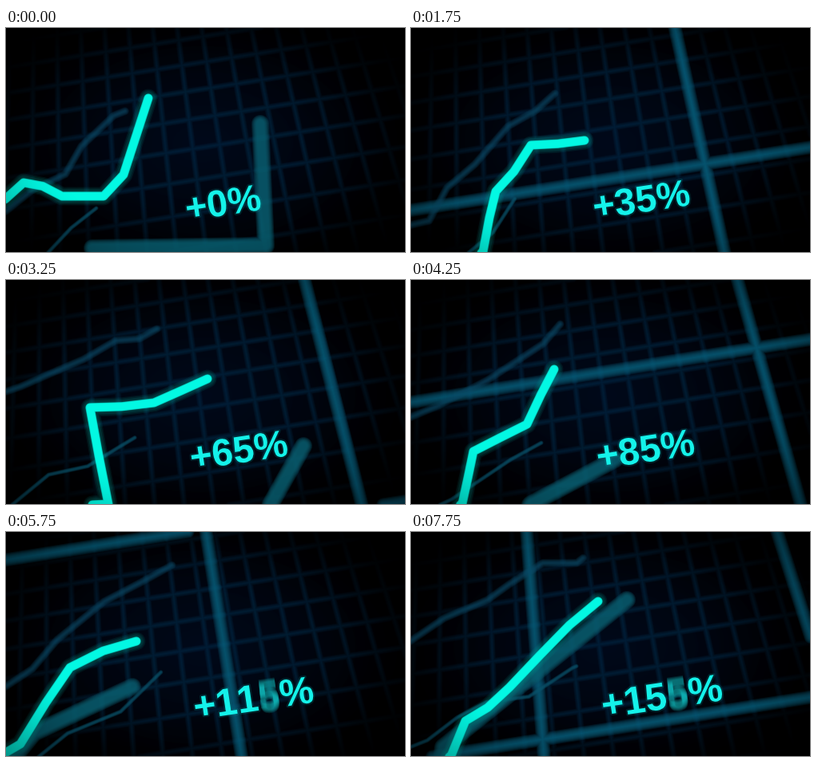
A matplotlib script that plays this animation: 499x281 px, repeating every 8000 ms.

```python
import numpy as np
import matplotlib.pyplot as plt
from matplotlib.animation import FuncAnimation
from matplotlib.patches import PathPatch
from matplotlib.path import Path
from matplotlib.textpath import TextPath

W, H = 499, 281
FRAMES, STEP = 32, 250

# Tilted plane: vertical lines meet at (VX, far above), rows keep one slope
FAR, VX, SLOPE = 1283, 46, 0.158

# Camera path over the plane, in plane units; the first key is a lead-in
TIMES = [-2, 0, 1.75, 3.25, 4.25, 5.75, 6.75, 7.75]
CAM_U = [-340, 0, 300, 635, 1015, 1415, 1577, 1808]
CAM_V = [-210, 0, 215, 300, 450, 639, 769, 839]
COLUMNS = [573, 948, 1360, 1613, 1905, 2198]
PITCH = 292
ROWS = -21 - PITCH * np.arange(3)
CELL = PITCH / 10

# Corners on screen at each camera key; the last one is the tip
MAIN = [
    [(-20, 232), (22, 194), (70, 211), (122, 211), (147, 184), (178, 88)],
    [(90, 281), (106, 205), (150, 147), (217, 141)],
    [(128, 281), (105, 160), (185, 154), (252, 124)],
    [(64, 281), (78, 215), (145, 181), (179, 112)],
    [(18, 266), (80, 170), (163, 137)],
    [(52, 281), (75, 219), (148, 209), (195, 161), (263, 171)],
    [(50, 281), (68, 237), (123, 195), (234, 87)],
]
NEAR = [
    [(108, 276), (325, 273), (318, 120)],
    [(300, 330)],
    [(330, 283), (372, 208)],
    [(150, 281), (255, 225)],
    [(35, 252), (158, 194)],
    [(115, 281), (125, 242), (310, 242)],
    [(40, 270), (270, 85)],
]


def to_plane(p):
    x, y = np.asarray(p, float).T
    d = y + SLOPE * x + FAR
    return np.column_stack([(x - VX) * FAR / d, FAR * (1 - FAR / d)])


def to_screen(u, v):
    d = FAR / (1 - np.asarray(v, float) / FAR)
    x = VX + np.asarray(u, float) * d / FAR
    return x, d - FAR - SLOPE * x


def camera(t):
    return np.interp(t, TIMES, CAM_U), np.interp(t, TIMES, CAM_V)


def shift(t):
    cu, cv = camera(t)
    return np.column_stack([cu, -cv])


class Series:
    """A polyline on the plane whose tip moves along it with time."""

    def __init__(self, pts, times, ends):
        self.pts = np.array(pts)
        gaps = np.hypot(*np.diff(self.pts, axis=0).T)
        self.dist = np.concatenate([[0], np.cumsum(gaps)])
        self.times, self.ends = times, self.dist[ends]

    def at(self, t):
        s = np.interp(t, self.times, self.ends)
        tip = [np.interp(s, self.dist, c) for c in self.pts.T]
        u, v = np.vstack([self.pts[self.dist < s], tip]).T
        cu, cv = camera(t)
        u, v = u - cu, v + cv
        first = np.argmax((u > -300) & (v < 450))
        return to_screen(u[first:], v[first:])


def cornered(stages, rough, seed):
    """Joins the corners of all stages, with bends on the long stretches."""
    rng = np.random.default_rng(seed)
    times = TIMES[1:]
    pts, ends = [], []
    for t, stage in zip(times, stages):
        for b in to_plane(stage) + shift(t):
            if pts:
                a = pts[-1]
                n = int(np.hypot(*(b - a)) // 45)
                for k in range(1, n + 1):
                    pts.append(a + (b - a) * k / (n + 1) + [0, rng.uniform(-rough, rough)])
            pts.append(b)
        ends.append(len(pts) - 1)
    return Series(pts, times, ends)


def traced(start, rate, seed, rough):
    """The jagged trail of a tip that drifts slowly across the screen."""
    rng = np.random.default_rng(seed)
    times = np.arange(-1.6, 8, .16)
    tips = np.array(start) + np.outer(times, rate)
    pts = to_plane(tips) + shift(times) + rng.uniform(-rough, rough, tips.shape)
    return Series(pts, times, np.arange(len(times)))


fig = plt.figure(figsize=((W + .01) / 72, (H + .01) / 72), dpi=72, facecolor="black")
ax = fig.add_axes([0, 0, 1, 1])
ax.axis("off")


def soft(color, width, blur, alpha, z, n=7):
    """Stacked strokes that read as one soft-edged line."""
    a = 1 - (1 - alpha) ** (1 / n)
    widths = np.linspace(width + blur, max(width - blur, .8), n)
    return [ax.plot([], [], color=color, lw=w, alpha=a, zorder=z,
                    solid_capstyle="round", solid_joinstyle="round")[0] for w in widths]


def put(lines, x, y):
    for line in lines:
        line.set_data(x, y)


def shade(image, z):
    ax.imshow(image, extent=(0, W, H, 0), zorder=z, aspect="auto", interpolation="bilinear")


gx, gy = np.meshgrid(np.arange(W) + .5, np.arange(H) + .5)
radius = np.hypot((gx - 245) / 300, (gy - 145) / 190)


def vignette(lo, hi, strength):
    k = np.clip((radius - lo) / (hi - lo), 0, 1)
    img = np.zeros((H, W, 4))
    img[..., 3] = strength * k * k * (3 - 2 * k)
    return img


glow = np.clip(1 - radius / 1.1, 0, 1)[..., None]
shade(glow * np.array([1, 9, 26]) / 255, 0)
shade(vignette(.35, 1.1, 1), 1.2)
shade(vignette(.6, 1.3, .5), 7)

minor = soft("#06304f", 4.5, 3.5, .55, 1, 5)
major = soft("#0a5f7c", 9, 8, .85, 1.5, 9)
layers = [
    (traced((160, 90), (8, -9), 3, 11), soft("#0d4a66", 6, 4, .7, 3)),
    (traced((112, 232), (13, -9), 5, 9), soft("#0c566e", 3.5, 2, .75, 3)),
    (cornered(NEAR, 0, 7), soft("#0b6072", 16, 6, .85, 4)),
    (cornered(MAIN, 4, 11), soft("#00a89c", 15, 8, .5, 5) + soft("#05fbe6", 9.5, 1.8, .99, 6)),
]


def segments(us, vs):
    """Lines of constant u and of constant v, split by gaps."""
    u, v = [], []
    for a in us:
        u += [a, a, np.nan]
        v += [-30, 330, np.nan]
    for b in vs:
        u += [-70, 460, np.nan]
        v += [b, b, np.nan]
    return to_screen(u, v)


FONT = dict(family="Liberation Sans", weight="bold")
ADVANCE = {"+": 58, "%": 88.9}
GLYPHS = {c: TextPath((0, 0), c, size=100, prop=FONT) for c in "+%0123456789"}
ANGLE = np.radians(8.5)
EMPTY = Path(np.zeros((1, 2)))


def patch(z, **style):
    p = PathPatch(EMPTY, zorder=z, **style)
    ax.add_patch(p)
    return p


halo = patch(8, fc="none", ec="#00a0a0", lw=4, alpha=.2, joinstyle="round")
label = patch(9, fc="#14f2ea", ec="none")
SMEAR = np.linspace(-5, 5, 11)
ghosts = [patch(9, fc="#14d0d0", ec="none", alpha=.14) for _ in SMEAR]


def place(glyph, pen, origin, size, lift=0):
    x, y = glyph.vertices.T * size / 100
    x, y = x + pen * size / 100, y + lift
    c, s = np.cos(ANGLE), np.sin(ANGLE)
    return Path(np.column_stack([origin[0] + x * c - y * s,
                                 origin[1] - x * s - y * c]), glyph.codes)


def draw_counter(value, p):
    text = f"+{value}%"
    size = 47 + 1.5 * p
    origin = 226.5 + 14 * p, 242 - 8.5 * p
    rolling = len(text) - 2 if value >= 100 else -1
    pen, solid = 0, []
    for g in ghosts:
        g.set_path(EMPTY)
    for i, c in enumerate(text):
        if i == rolling:
            for g, lift in zip(ghosts, SMEAR):
                g.set_path(place(GLYPHS[c], pen, origin, size, lift))
        else:
            solid.append(place(GLYPHS[c], pen, origin, size))
        pen += ADVANCE.get(c, 56)
    shape = Path.make_compound_path(*solid)
    label.set_path(shape)
    halo.set_path(shape)


def draw(i):
    t = i * STEP / 1000
    cu, cv = camera(t)
    us = np.arange(-70 - cu % CELL, 460, CELL)
    vs = np.arange(-40 + cv % CELL, 330, CELL)
    put(minor, *segments(us, vs))
    cols = [c - cu for c in COLUMNS if -90 < c - cu < 480]
    rows = [r + cv for r in ROWS if -40 < r + cv < 330]
    put(major, *segments(cols, rows))
    for series, lines in layers:
        put(lines, *series.at(t))
    draw_counter(5 * i, i / (FRAMES - 1))
    return []


ax.set_xlim(0, W)
ax.set_ylim(H, 0)
anim = FuncAnimation(fig, draw, frames=FRAMES, init_func=lambda: [], interval=STEP,
                     repeat=True, repeat_delay=0, blit=False)
plt.show()
```
